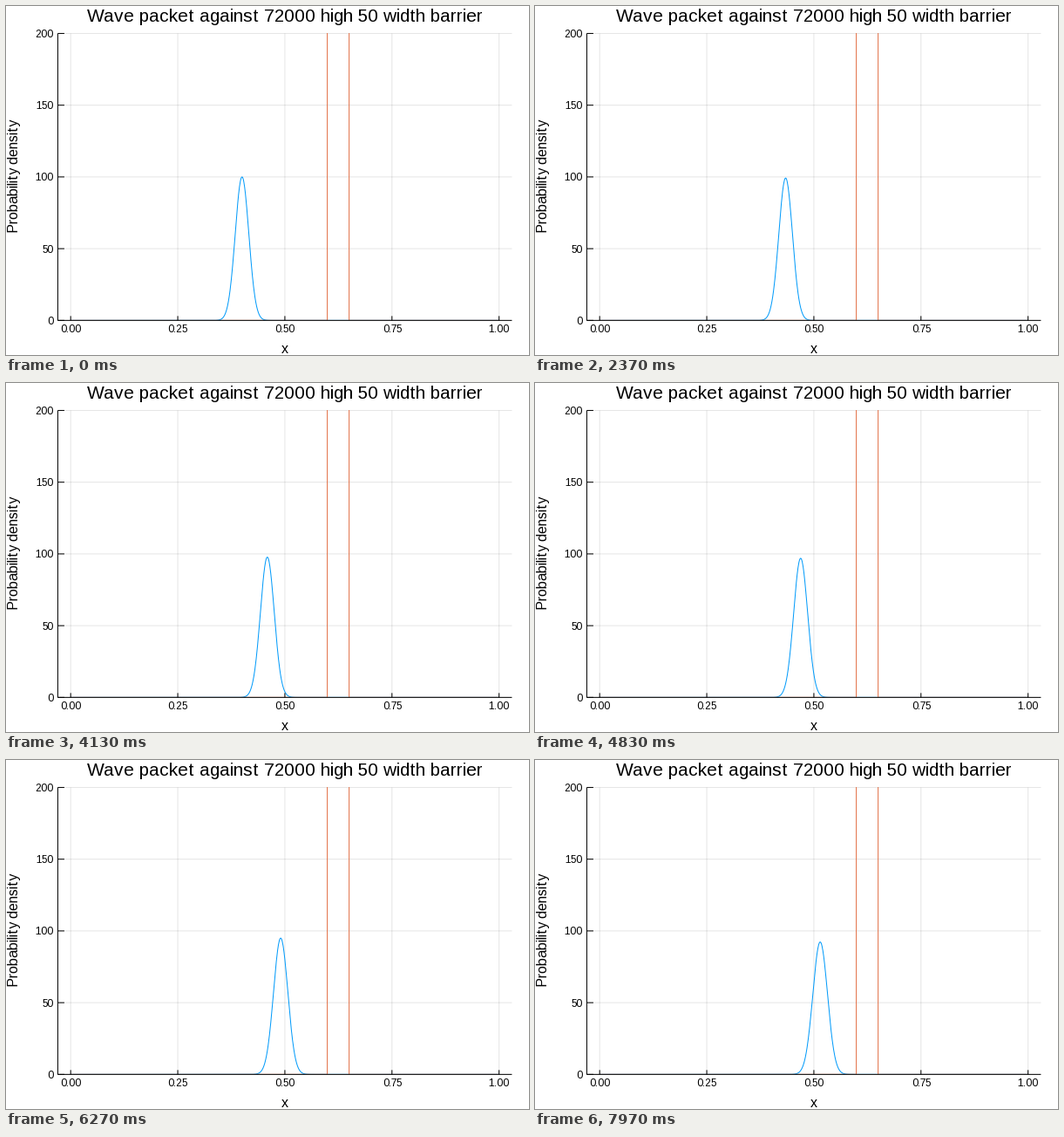
These frames come from a looping animation (600x400 px, 8 s). A matplotlib script:

```python
import numpy as np
import matplotlib.pyplot as plt
from matplotlib.animation import FuncAnimation

W, H, DPI = 600, 400, 100
PX = 72 / DPI
FRAMES, LOOP = 240, 8000

# plot area in pixels, measured from the top left
LEFT, RIGHT, TOP, BOTTOM = 59.45, 580.4, 31.45, 360.35
XMIN, XMAX, YMAX = -0.03, 1.03, 200

START, SPEED = 0.4, 0.00048
PEAK, SIGMA, SPREAD = 100, 4000 ** -0.5, 573

# whole-pixel letter advances, lines at their true sub-pixel places
plt.rcParams.update({
    "font.family": "Liberation Sans",
    "text.hinting": "force_autohint",
    "text.hinting_factor": 1,
    "path.snap": False,
})

fig = plt.figure(figsize=(W / DPI, H / DPI), dpi=DPI, facecolor="white")
ax = fig.add_axes([LEFT / W, 1 - BOTTOM / H, (RIGHT - LEFT) / W, (BOTTOM - TOP) / H])
ax.set_xlim(XMIN, XMAX)
ax.set_ylim(0, YMAX)
ax.patch.set_visible(False)
for spine in ax.spines.values():
    spine.set_visible(False)

xticks = np.linspace(0, 1, 5)
yticks = np.arange(0, YMAX + 1, 50)
ax.set_xticks([])
ax.set_yticks([])


def to_px(x, y):
    px = LEFT + (x - XMIN) / (XMAX - XMIN) * (RIGHT - LEFT)
    py = BOTTOM - y / YMAX * (BOTTOM - TOP)
    return px, py


def rule(xs, ys, color="black", **kw):
    """Draw a straight one-pixel line in data units."""
    ax.plot(xs, ys, color=color, linewidth=PX, clip_on=False,
            solid_capstyle="butt", **kw)


def label(x, y, text, size, **kw):
    """Write text with its baseline at pixel (x, y)."""
    opts = dict(ha="center", va="baseline", fontsize=size * PX, color="black")
    opts.update(kw)
    fig.text(x / W, 1 - y / H, text, **opts)


tick_w = 7.5 * (XMAX - XMIN) / (RIGHT - LEFT)
tick_h = 5 * YMAX / (BOTTOM - TOP)
for t in xticks:
    rule([t, t], [0, YMAX], alpha=0.1, zorder=1)
    rule([t, t], [0, tick_h], zorder=5)
    label(to_px(t, 0)[0], 374, f"{t:.2f}", 12)
for t in yticks:
    rule([XMIN, XMAX], [t, t], alpha=0.1, zorder=1)
    rule([XMIN, XMIN + tick_w], [t, t], zorder=5)
    label(54.5, to_px(0, t)[1] + 4.4, f"{t}", 12, ha="right")
rule([XMIN, XMAX], [0, 0], zorder=5)
rule([XMIN, XMIN], [0, YMAX], zorder=5)

mid = (LEFT + RIGHT) / 2
label(mid, 18, "Wave packet against 72000 high 50 width barrier", 21)
label(mid, 398, "x", 16)
label(14, 195.5, "Probability density", 16, rotation=90, rotation_mode="anchor")

grid = np.linspace(0, 1, 1001)
packet, = ax.plot([], [], color="#009AFA", linewidth=PX, zorder=3)
ax.plot([0, 0.599, 0.65, 1], [0, 72000, 0, 0], color="#E26F46",
        linewidth=PX, drawstyle="steps-post", zorder=4)
ax.set_xlim(XMIN, XMAX)
ax.set_ylim(0, YMAX)


def draw(n):
    stretch = np.sqrt(1 + (n / SPREAD) ** 2)
    offset = (grid - START - SPEED * n) / (SIGMA * stretch)
    packet.set_data(grid, PEAK / stretch * np.exp(-offset ** 2 / 2))
    return packet,


anim = FuncAnimation(fig, draw, frames=FRAMES, interval=LOOP / FRAMES,
                     repeat=True, repeat_delay=0)
plt.show()
```
